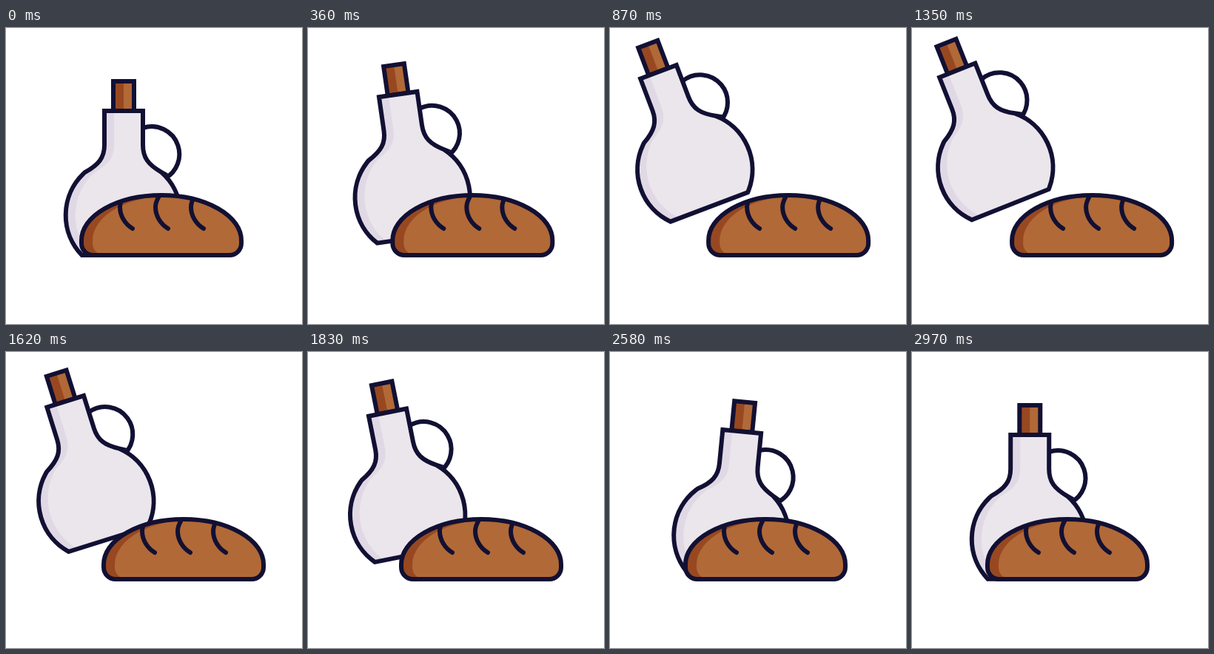
An HTML page with a canvas that plays this animation: 400x400 px, repeating every 3 s.

```html
<!DOCTYPE html>
<html lang="en">
<head>
<meta charset="utf-8">
<title>Bottle and bread</title>
<style>
html, body { margin: 0; width: 100%; height: 100%; overflow: hidden; background: #fff; }
canvas { display: block; width: 400px; height: 400px; }
</style>
</head>
<body>
<canvas id="stage" width="400" height="400"></canvas>
<script>
const ctx = document.getElementById('stage').getContext('2d');
const LOOP = 3000;
const INK = '#121033', GLASS = '#eae6ec', GLASS_DARK = '#e0d9e5';
const CRUST = '#b16937', CRUST_DARK = '#984820';

// Cubic easing with flat ends; a and b are the x of its handles.
function ease(u, a, b) {
  if (u <= 0) return 0;
  if (u >= 1) return 1;
  let lo = 0, hi = 1, s = 0.5;
  for (let i = 0; i < 24; i++) {
    s = (lo + hi) / 2;
    const r = 1 - s;
    if (3 * r * r * s * a + 3 * r * s * s * b + s * s * s < u) lo = s;
    else hi = s;
  }
  return s * s * (3 - 2 * s);
}

const away = t => ease(t / 1200, 0.3, 0.345);

function breadShift(t) {
  const p = t < 1200 ? away(t) : 1 - ease((t - 1200) / 1200, 0.727, 0.667);
  return 33.5 * p;
}

// How far the bottle has been lifted, 0 to 1.
function lift(t) {
  if (t < 1200) return away(t);
  return t < 2100 ? 1 - ((t - 1200) / 900) ** 2 : 0;
}

// Rocking on the right corner of the base, in degrees.
function rock(t) {
  if (t < 2100) return 0;
  if (t < 2550) return 5.6 * (1 - (1 - (t - 2100) / 450) ** 3);
  return 5.6 * (1 - ease((t - 2550) / 450, 2 / 3, 2 / 3));
}

function turn(deg, x, y) {
  ctx.translate(x, y);
  ctx.rotate(deg * Math.PI / 180);
  ctx.translate(-x, -y);
}

function bottlePath() {
  const p = new Path2D(), cx = 158.4, cy = 253, r = 77.7;
  const base = Math.asin(54 / r), top = -Math.asin(58.2 / r);
  p.moveTo(133, 112);
  p.lineTo(185, 112);
  p.lineTo(185, 158);
  p.bezierCurveTo(185, 175, 192, 184.5, 209.9, 194.8);
  p.arc(cx, cy, r, top, base);
  p.arc(cx, cy, r, Math.PI - base, Math.PI - top);
  p.bezierCurveTo(125.5, 184.5, 133, 175, 133, 158);
  p.closePath();
  return p;
}

function breadPath() {
  const p = new Path2D();
  p.moveTo(102, 287);
  p.ellipse(210, 287, 108, 61, 0, Math.PI, Math.PI * 2);
  p.arcTo(318, 307, 304, 307, 16);
  p.arcTo(102, 307, 102, 290, 16);
  p.closePath();
  return p;
}

const bottle = bottlePath(), bread = breadPath();

// Dark fill with the lighter tone offset to the right, then the outline.
function shaded(path, dark, light, dx) {
  ctx.save();
  ctx.clip(path);
  ctx.fillStyle = dark;
  ctx.fill(path);
  ctx.translate(dx, 0);
  ctx.fillStyle = light;
  ctx.fill(path);
  ctx.restore();
  ctx.stroke(path);
}

function drawBottle(t) {
  const p = lift(t);
  ctx.save();
  ctx.translate(-63.5 * p, -63.5 * p);
  turn(-22.3 * p, 159, 209.5);
  turn(rock(t), 215, 307);

  ctx.beginPath();
  ctx.arc(197, 170.5, 37.3, -1.9, 1.05);
  ctx.stroke();

  ctx.fillStyle = CRUST;
  ctx.fillRect(145, 72, 28, 40);
  ctx.fillStyle = CRUST_DARK;
  ctx.fillRect(145, 72, 14, 40);
  ctx.strokeRect(145, 72, 28, 40);

  shaded(bottle, GLASS_DARK, GLASS, 13);
  ctx.restore();
}

function drawBread(t) {
  ctx.save();
  ctx.translate(breadShift(t), 0);
  shaded(bread, CRUST_DARK, CRUST, 15);
  ctx.clip(bread);
  ctx.lineCap = 'round';
  for (const x of [171, 219, 267]) {
    ctx.beginPath();
    ctx.moveTo(x, 271);
    ctx.bezierCurveTo(x - 10, 265, x - 17, 254, x - 17, 242);
    ctx.bezierCurveTo(x - 17, 237, x - 15, 232, x - 12, 227);
    ctx.stroke();
  }
  ctx.restore();
}

function draw(t) {
  ctx.fillStyle = '#fff';
  ctx.fillRect(0, 0, 400, 400);
  ctx.strokeStyle = INK;
  ctx.lineWidth = 6;
  drawBottle(t);
  drawBread(t);
}

function tick() {
  draw(performance.now() % LOOP);
  requestAnimationFrame(tick);
}
tick();
</script>
</body>
</html>
```
